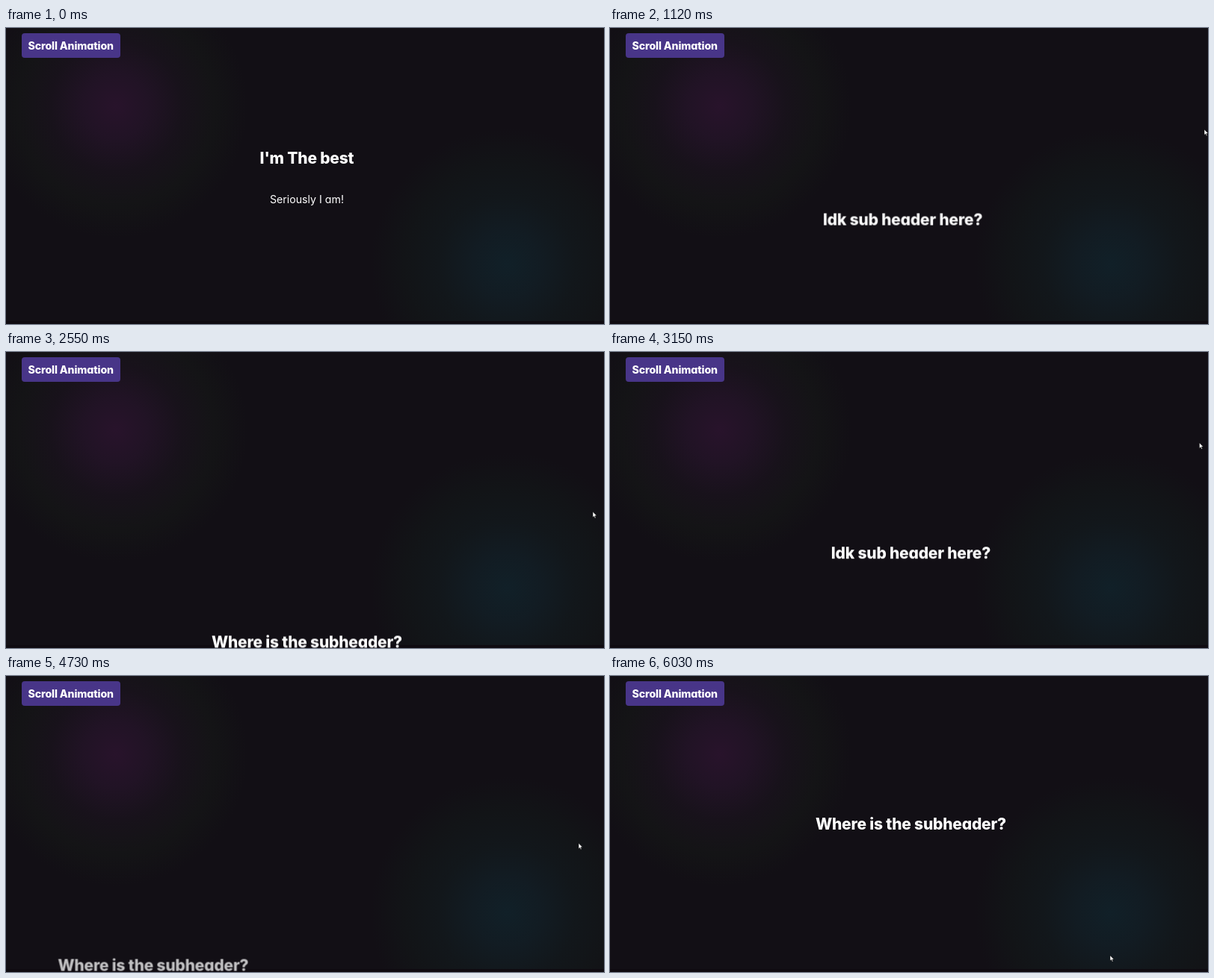
An HTML page with a canvas that plays this animation: 800 by 397 pixels, repeating every 6.09 s.

```html
<!DOCTYPE html>
<html lang="en">
<head>
<meta charset="utf-8">
<title>Scroll Animation</title>
<style>
  html, body { margin: 0; width: 100%; height: 100%; overflow: hidden; background: #120f15; }
  #stage {
    position: relative; width: 800px; height: 397px; overflow: hidden; color: #fff;
    font-family: Inter, "Open Sans", sans-serif; font-feature-settings: "cv11";
  }
  canvas, section, #cursor { position: absolute; left: 0; top: 0; }
  section { width: 805px; height: 397px; text-align: center; will-change: transform; }
  h1, p { position: absolute; left: 0; width: 100%; margin: 0; line-height: 40px; white-space: nowrap; }
  h1 { top: 179px; font-size: 21px; font-weight: 800; letter-spacing: -.01em; }
  p { top: 210px; font-size: 14.2px; }
  #first h1 { top: 155px; }
  #badge {
    position: absolute; left: 20.5px; top: 6.5px; width: 132.5px; height: 33px; border-radius: 4px;
    background: #483588; font-size: 14.2px; font-weight: 800; line-height: 33px;
    letter-spacing: -.01em; text-align: center; white-space: nowrap;
  }
</style>
</head>
<body>
<div id="stage">
  <canvas id="back" width="800" height="397"></canvas>
  <section id="first"><h1>I'm The best</h1><p>Seriously I am!</p></section>
  <section><h1>Idk sub header here?</h1></section>
  <section><h1>Where is the subheader?</h1></section>
  <div id="badge">Scroll Animation</div>
  <svg id="cursor" width="8" height="11" viewBox="-1 -1 8 11">
    <path d="M0 0V7.4L1.7 5.9L2.9 8.6L4.1 8.1L2.9 5.5L5.2 5.3Z"
          fill="#fff" stroke="#000" stroke-width=".5"/>
  </svg>
</div>
<script>
const LOOP = 6090, PAGE = 397, SLIDE = 870, LEAD = 30;

// The pointer drags the scrollbar: time, drag distance in page pixels, pointer x
const path = [
  [330, -10, 803], [1120, 338, 795], [1730, 705, 796], [2050, 860, 790],
  [2550, 604, 785], [3330, 235, 790], [3750, -25, 796], [4343, 397, 782],
  [4730, 604, 766], [5300, 850, 771], [5950, 1070, 669]
];
// Times at which each section starts sliding in
const entries = [[-SLIDE, 2945], [383, 2165], [1177, 4343]];

const clamp = (v, lo, hi) => Math.min(hi, Math.max(lo, v));

// Monotone cubic interpolation of one column of the path
function follow(t, col) {
  const last = path.length - 1;
  t = clamp(t, path[0][0], path[last][0]);
  const slope = i => (path[i + 1][col] - path[i][col]) / (path[i + 1][0] - path[i][0]);
  const tangent = i => {
    const a = slope(Math.max(i - 1, 0)), b = slope(Math.min(i, last - 1));
    return a * b <= 0 ? 0 : 2 * a * b / (a + b);
  };
  let i = 0;
  while (t > path[i + 1][0]) i++;
  const d = path[i + 1][0] - path[i][0], u = (t - path[i][0]) / d, w = 1 - u;
  return path[i][col] * (1 + 2 * u) * w * w + path[i + 1][col] * u * u * (3 - 2 * u)
    + d * u * w * (w * tangent(i) - u * tangent(i + 1));
}

// Same curve as the CSS "ease" keyword
function ease(x) {
  if (x <= 0 || x >= 1) return clamp(x, 0, 1);
  let s = 0.5;
  for (let step = 0.25; step > 1e-5; step /= 2) {
    s += 0.75 * s * (1 - s) + s ** 3 < x ? step : -step;
  }
  return 0.3 * s * (1 - s) ** 2 + 3 * s * s * (1 - s) + s ** 3;
}

function glow(g, x, y, radius, ...colors) {
  const fill = g.createRadialGradient(x, y, 0, x, y, radius);
  colors.forEach((c, i) => fill.addColorStop(i / (colors.length - 1), c));
  g.fillStyle = fill;
  g.fillRect(x - radius, y - radius, radius * 2, radius * 2);
}

function paintBack() {
  const g = document.getElementById("back").getContext("2d");
  g.fillStyle = "#120f15";
  g.fillRect(0, 0, 800, PAGE);
  glow(g, 147, 105, 176, "#28132b", "#211325", "#18121b", "#141416", "#120f15");
  glow(g, 670, 317, 182, "#112028", "#121c23", "#12171b", "#121417", "#120f15");
  g.fillStyle = "#0f0b11";
  g.fillRect(0, 393, 800, 4);
}

const sections = [...document.querySelectorAll("section")];
const cursor = document.getElementById("cursor");

function draw(t) {
  const scroll = clamp(follow(t, 1), 0, PAGE * (sections.length - 1));
  sections.forEach((el, i) => {
    const [early, late] = entries[i];
    const shown = ease((t - (t < late ? early : late)) / SLIDE);
    const y = i * PAGE - scroll;
    el.style.visibility = Math.abs(y) < PAGE ? "visible" : "hidden";
    el.style.transform = `translate(${(shown - 1) * 800}px, ${y}px)`;
    el.style.opacity = shown;
    el.style.filter = shown < 1 ? `blur(${(1 - shown) * 2.5}px)` : "none";
  });
  // The page trails slightly behind the pointer
  const x = follow(t, 2), y = 18 + follow(t + LEAD, 1) / 3;
  cursor.style.transform = `translate(${x - 1}px, ${y - 1}px)`;
}

const start = performance.now();
function tick() {
  draw((performance.now() - start) % LOOP);
  requestAnimationFrame(tick);
}
paintBack();
tick();
</script>
</body>
</html>
```
